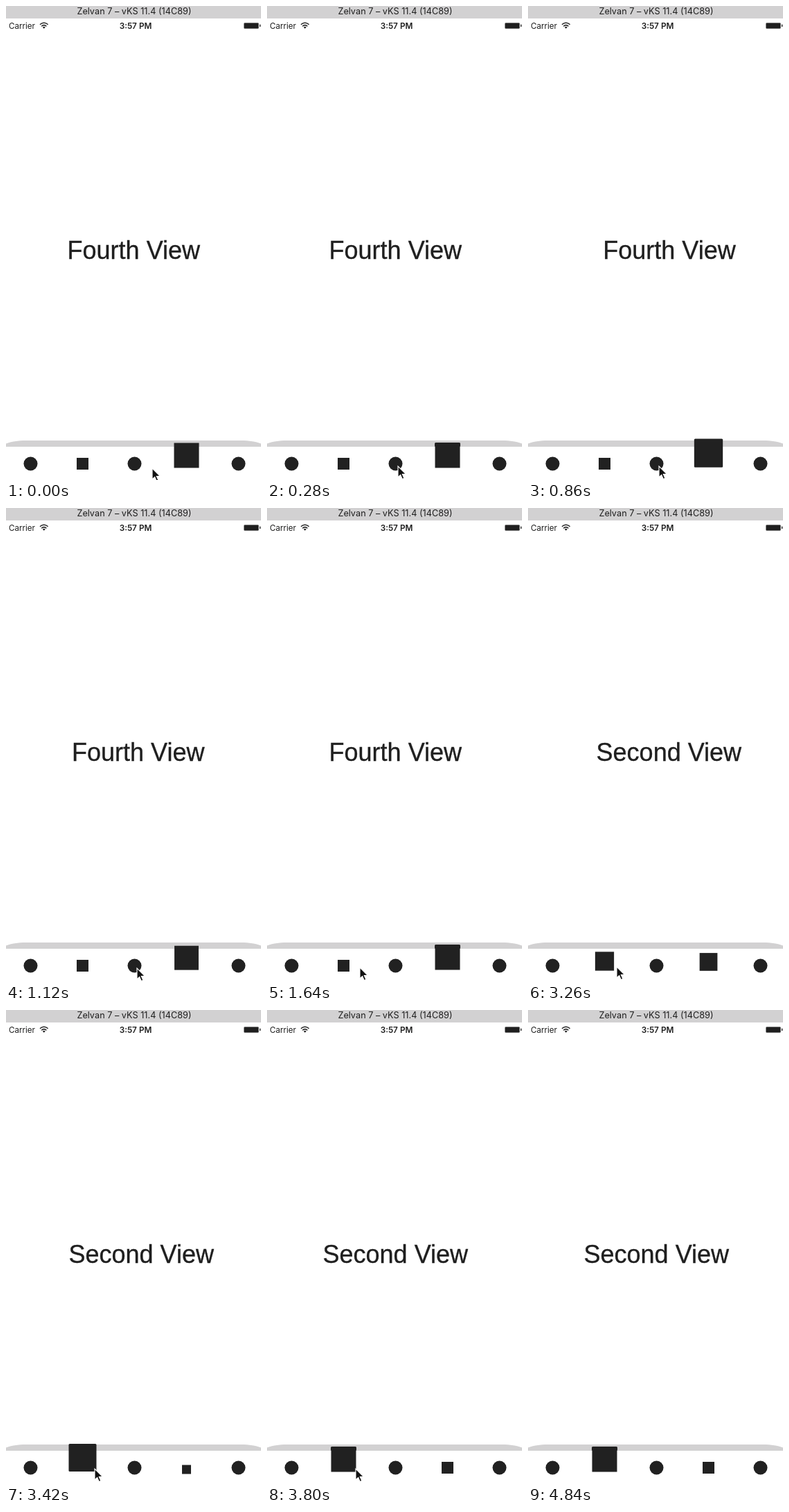
Recreate the animation shown at these times as an HTML page. Size 368 px wide and 684 px high, loop 5.18 s.

```html
<!DOCTYPE html>
<html lang="en">
<head>
<meta charset="utf-8">
<title>Tab bar</title>
<style>
  html, body { margin: 0; width: 100%; height: 100%; overflow: hidden; background: #fff; }
  svg { display: block; width: 100%; height: 100%; }
  text { fill: #1f1f1f; font-kerning: none; }
  .ui { font-family: Inter, Roboto, sans-serif; }
  .label { font: 36px "Liberation Sans", Arial, sans-serif; text-anchor: middle; stroke: #1f1f1f; stroke-width: .35; }
  .icon { fill: #212121; }
  .bar { fill: #d2d1d2; }
</style>
</head>
<body>
<svg viewBox="0 0 368 684">
  <rect width="368" height="684" fill="#fff"/>
  <rect class="bar" width="368" height="18"/>
  <text class="ui" x="185" y="12" font-size="12.7" text-anchor="middle">Zelvan 7 – vKS 11.4 (14C89)</text>

  <text class="ui" x="4" y="32.5" font-size="11.7">Carrier</text>
  <g fill="none" stroke="#1f1f1f" stroke-width="1.5">
    <path d="M49 26.8Q54.8 21.6 60.6 26.8M51.2 29.2Q54.8 26 58.4 29.2"/>
    <path d="M52.8 30.5Q54.8 28.8 56.8 30.5L54.8 32.8Z" fill="#1f1f1f" stroke="none"/>
  </g>
  <text class="ui" x="187" y="32.5" font-size="11.8" font-weight="600" text-anchor="middle">3:57 PM</text>
  <rect x="343.5" y="24.5" width="21" height="8" rx="1.2" fill="#1f1f1f" stroke="#777"/>
  <rect x="366" y="26.5" width="1.3" height="3.6" rx=".6" fill="#1f1f1f"/>

  <text class="label" id="label" y="365"></text>

  <path class="bar" d="M0 636V631.6C8 628.6 16 627 30 627H338C352 627 360 628.6 368 631.6V636Z"/>
  <g class="icon">
    <circle cx="35.5" cy="660.5" r="10"/>
    <circle cx="185.5" cy="660.5" r="10"/>
    <circle cx="335.5" cy="660.5" r="10"/>
    <rect id="second"/>
    <rect id="fourth"/>
    <rect id="cap" y="630" width="37" height="6.3" rx="2"/>
  </g>
  <path id="cursor" d="M0 0V16L3.7 12.6L6.3 18.6L8.9 17.5L6.3 11.6H11.4Z"
        fill="#111" stroke="#fff" stroke-width="1.1"/>
</svg>
<script>
const LOOP = 5180;
const RETAP = 780, SWITCH = 3160;
const SLIDE = 520, SETTLE = 600;
const DECAY = 5.85, FREQ = 11.8;
const SMALL = 17, GROW = 19, RISE = 12;
const COLUMN = { second: 110.5, fourth: 260.5 };
const CURSOR = [
  [0, 211, 667], [20, 211, 667], [280, 189, 664], [1320, 189, 664],
  [1640, 134, 663], [1860, 128, 662], [4240, 128, 662], [4310, 127, 688], [LOOP, 127, 688]
];

const $ = id => document.getElementById(id);
const clamp = v => Math.min(1, Math.max(0, v));
const smooth = v => v * v * (3 - 2 * v);

function set(id, attrs) {
  for (const key in attrs) $(id).setAttribute(key, attrs[key]);
}

// Damped spring from 0 to 1
function spring(ms) {
  if (ms <= 0) return 0;
  const s = ms / 1000;
  return 1 - Math.exp(-DECAY * s) * (Math.cos(FREQ * s) + DECAY / FREQ * Math.sin(FREQ * s));
}

// Kick that swings around rest and dies away
function kick(ms) {
  if (ms <= 0) return 0;
  const s = ms / 1000;
  return .55 * Math.exp(-DECAY * s) * Math.sin(FREQ * s);
}

function drawIcon(id, p) {
  const size = SMALL + GROW * p;
  set(id, {
    x: COLUMN[id] - size / 2, y: 660.5 - RISE * p - size / 2,
    width: size, height: size, rx: p > 1.05 ? 1.5 : 0
  });
}

function drawCursor(t) {
  const i = CURSOR.findIndex(k => k[0] > t);
  const [t0, x0, y0] = CURSOR[i - 1], [t1, x1, y1] = CURSOR[i];
  const k = smooth((t - t0) / (t1 - t0));
  set("cursor", { transform: `translate(${x0 + (x1 - x0) * k} ${y0 + (y1 - y0) * k})` });
}

function draw(t) {
  const switched = t >= SWITCH;
  const since = t - (switched ? SWITCH : RETAP);
  const settled = since >= SETTLE;
  const shift = since < 0 ? -clamp(1 - t / 140) : 20 * (1 - smooth(clamp(since / SLIDE)));
  $("label").textContent = switched ? "Second View" : "Fourth View";
  set("label", { x: 185.3 + shift });

  const grown = settled ? 1 : spring(since);
  drawIcon("second", switched ? grown : 0);
  drawIcon("fourth", switched ? 1 - grown : 1 + (settled ? 0 : kick(since)));

  const resting = since < 0 ? t >= 140 : settled;
  set("cap", {
    x: COLUMN[switched ? "second" : "fourth"] - 18.5,
    visibility: resting ? "visible" : "hidden"
  });
  drawCursor(t);
}

const begin = performance.now();
function tick() {
  draw((performance.now() - begin) % LOOP);
  requestAnimationFrame(tick);
}
tick();
</script>
</body>
</html>
```
